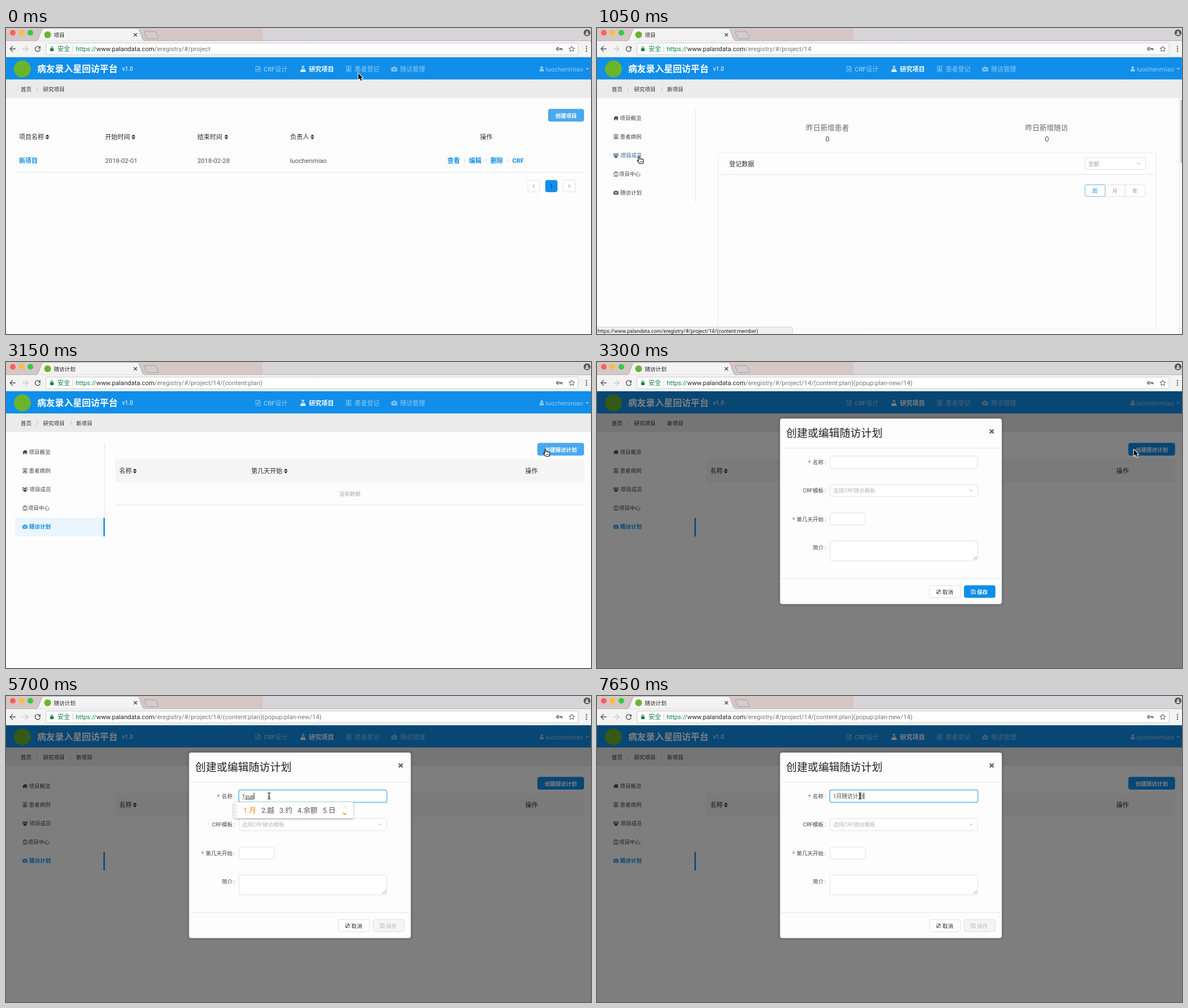
Animation, 1033 px wide and 542 px high, one loop 8 s. Source, as an HTML page with a canvas:

```html
<!DOCTYPE html>
<html lang="zh-CN">
<head>
<meta charset="utf-8">
<title>随访计划</title>
<style>
html, body { margin: 0; width: 100%; height: 100%; overflow: hidden; background: #fdfdfd; }
canvas { display: block; }
</style>
</head>
<body>
<canvas id="stage" width="1033" height="542"></canvas>
<script>
const c = document.getElementById('stage').getContext('2d');
const FONT = 'Roboto, "Noto Sans CJK SC", "Noto Sans CJK JP", sans-serif';
const LOOP = 8000, STEP = 150;
const BLUE = '#108ee9', LIGHT = '#49a9ee', INK = '#2b2b2b', GREY = '#d9d9d9', GREEN = '#0b8043', LOGO = '#6ab42d';
const USER = 'luochenmiao', APP = '病友录入星回访平台';
const HOST = 'www.palandata.com', ROOT = '/eregistry/#/project';

// Icons on a 12 unit grid, filled even-odd
const ICONS = {
  home: 'M0 6.2L6 1L8.6 3.2V1.6H10.2V4.6L12 6.2L11.2 7.1L10.3 6.4V11H7.2V8H4.8V11H1.7V6.4L.8 7.1Z',
  badge: 'M1 0H11V12H1ZM2 1V11H10V1ZM6 2.4a1.7 1.7 0 0 1 0 3.4a1.7 1.7 0 0 1 0-3.4ZM3.2 9.4Q3.2 6 6 6.4Q8.8 6 8.8 9.4Z',
  users: 'M6 2a2.1 2.1 0 0 1 0 4.2a2.1 2.1 0 0 1 0-4.2ZM2.4 11.5Q2.2 6.6 6 6.8Q9.8 6.6 9.6 11.5ZM2 1a1.6 1.6 0 0 1 0 3.2a1.6 1.6 0 0 1 0-3.2ZM10 1a1.6 1.6 0 0 1 0 3.2a1.6 1.6 0 0 1 0-3.2ZM-.4 8Q-.4 4.6 2.4 5L3 6.4L1.8 8ZM12.4 8Q12.4 4.6 9.6 5L9 6.4L10.2 8Z',
  clinic: 'M1 2.5H3.5V0H8.5V2.5H11V12H1ZM2 3.5V11H4.8V8.5H7.2V11H10V3.5H7.5V1H4.5V3.5ZM3.3 5H4.7V6.4H3.3ZM7.3 5H8.7V6.4H7.3ZM5.4 1.7H6.6V4H5.4Z',
  kit: 'M0 3H3.4V1.2H8.6V3H12V11H0ZM4.5 3H7.5V2.2H4.5ZM5.3 4.6V6.3H3.6V7.7H5.3V9.4H6.7V7.7H8.4V6.3H6.7V4.6ZM1.5 3V11H2.2V3ZM9.8 3V11H10.5V3Z',
  flask: 'M3.5 0H8.5V1.1H7.8V4.3L11.6 10.6Q11.8 12 10.4 12H1.6Q.2 12 .4 10.6L4.2 4.3V1.1H3.5ZM5.3 1.1V4.6L3.8 7.2H8.2L6.7 4.6V1.1Z',
  file: 'M1 0H7.8L11 3.2V12H1ZM2 1V11H10V4H7V1ZM3.2 5.2H4.1L4.9 8L5.6 5.2H6.4L7.1 8L7.9 5.2H8.8L7.6 9.4H6.7L6 7L5.3 9.4H4.4Z',
  user: 'M6 0a3 3 0 0 1 0 6.4a3 3 0 0 1 0-6.4ZM.8 11.6Q.6 6.4 3 6Q6 8.4 9 6Q11.4 6.4 11.2 11.6Z',
  ban: 'M6 0a6 6 0 0 1 0 12a6 6 0 0 1 0-12ZM3.4 9.9L9.9 3.4A4.6 4.6 0 0 1 3.4 9.9ZM2.1 8.6L8.6 2.1A4.6 4.6 0 0 0 2.1 8.6Z',
  save: 'M0 0H9L12 3V12H0ZM1.1 1.1V10.9H2.4V6.8H9.6V10.9H10.9V3.5L8.6 1.1V4.6H2.6V1.1ZM3.7 1.1V3.5H7.4V1.1ZM3.5 7.9V10.9H8.5V7.9Z'
};
const ARROW = 'M0 0V11.6L2.7 9.1L4.6 13.4L6.4 12.6L4.6 8.5H8.2Z';
const HAND = 'M2 1.5Q3-.6 4.2 1.3V5Q5.5 4 6.5 5.2Q8 4.4 8.8 5.6Q10.6 5 11 6.8V9.5L10 13.3H4.4L.6 8.8Q-.4 7 1 6.7L2.4 8Z';

// Pointer: time, x, y, shape
const POINTER = [
  [0, 622, 80, 'arrow'], [300, 240, 180, 'arrow'], [450, 38, 232, 'hand'], [600, 38, 232, 'arrow'],
  [900, 64, 219, 'hand'], [1050, 71, 227, 'hand'], [1200, 73, 236, 'hand'], [1650, 126, 285, 'hand'],
  [2250, 127, 284, 'hand'], [2400, 220, 270, 'arrow'], [3000, 946, 156, 'hand'], [3150, 949, 154, 'hand'],
  [3300, 948, 155, 'arrow'], [3450, 940, 157, 'arrow'], [3900, 480, 176, 'beam'], [4200, 464, 177, 'beam'], [LOOP, 464, 177, 'beam']
];
// Typing: time, committed text, composing text
const TYPING = [
  [0, '', ''], [4650, '1', ''], [5400, '1', 'y'], [5550, '1', 'yu'], [5700, '1', 'yue'], [5850, '1月', ''],
  [6000, '1月', 's'], [6150, '1月', 'su'], [6300, '1月', 'sui'], [6450, '1月', 'suif'], [6600, '1月', 'suifa'],
  [6750, '1月', 'suifang'], [7050, '1月', 'suifangj'], [7200, '1月', 'suifangji'], [7350, '1月', 'suifangjihu'],
  [7500, '1月', 'suifangjihua'], [7650, '1月随访计划', '']
];
const candidates = word =>
  word[0] === 'y' ? '月 越 约 余额 日' :
  word.length < 4 ? '随机 虽然 随便 随时 随意' :
  word.length < 8 ? '随访 随风 随份 岁方 随方' : '随访计划 随访级 随访 随方 岁';

function setFont(size, weight = 400) { c.font = `${weight} ${size}px ${FONT}`; }
function text(s, x, y, size, color = INK, weight = 400, align = 'left') {
  setFont(size, weight);
  c.textAlign = align;
  c.fillStyle = color;
  c.fillText(s, x, y + size * .37);
  return x + c.measureText(s).width;
}
function rect(x, y, w, h, fill) { c.fillStyle = fill; c.fillRect(x, y, w, h); }
function box(x, y, x2, y2, fill, line = GREY, r = 3) {
  c.beginPath();
  c.roundRect(x + .7, y + .7, x2 - x - 1.4, y2 - y - 1.4, r);
  c.fillStyle = fill;
  c.fill();
  c.strokeStyle = line;
  c.lineWidth = .8;
  c.stroke();
}
function dot(x, y, r, fill) { c.beginPath(); c.arc(x, y, r, 0, 7); c.fillStyle = fill; c.fill(); }
function path(d, x, y, { fill, line, width = 1, scale = 1 }) {
  const p = new Path2D(d);
  c.save();
  c.translate(x, y);
  c.scale(scale, scale);
  c.lineWidth = width;
  c.lineJoin = 'round';
  if (fill) { c.fillStyle = fill; c.fill(p, 'evenodd'); }
  if (line) { c.strokeStyle = line; c.stroke(p); }
  c.restore();
}
function icon(name, x, y, size, fill) { path(ICONS[name], x - size / 2, y - size / 2, { fill, scale: size / 12 }); }
function sorter(x, y) { path('M-3.5-.8L0-4.2L3.5-.8ZM-3.5.8L0 4.2L3.5.8Z', x, y, { fill: INK }); }
function chevron(x, y) { path('M-2.6-1.4L0 1.4L2.6-1.4', x, y, { line: '#aaa' }); }
function button(s, x, y, x2, y2, fill) {
  box(x, y, x2, y2, fill, fill);
  text(s, (x + x2) / 2, (y + y2) / 2 + .5, 9.5, '#fff', 700, 'center');
}

function browser(t) {
  rect(0, 0, 1033, 23, '#d5c7c6');
  rect(453, 0, 580, 23, '#d8d5da');
  [['#fc605c', 12], ['#fdbc40', 27.5], ['#34c84a', 43]].forEach(([color, x]) => dot(x, 8.5, 5, color));
  rect(0, 23, 1033, 28.7, '#f3f3f3');
  rect(0, 22, 1033, 1, '#b9b0b0');
  path('M52 23Q56 22 57 19L63 3Q64 .5 67 .5H231Q234 .5 235 3L241 19Q242 22 246 23Z', 0, 0, { fill: '#f3f3f3', line: '#b0a6a6' });
  rect(53, 22.5, 192, 2, '#f3f3f3');
  path('M245 6.5H262Q264 6.5 265 8L269 17Q269 19 267 19H251Q249 19 248 17L244 8Z', 0, 0, { fill: '#d3cccc', line: '#a59d9d' });
  dot(73.5, 12, 6, LOGO);
  text(t < 2400 ? '项目' : '随访计划', 84.5, 12, 9.5, '#222');
  path('M-2.8-2.8L2.8 2.8M2.8-2.8L-2.8 2.8', 228.5, 12, { line: '#444', width: 1.3 });
  dot(1026, 8.5, 6, '#555');
  icon('user', 1026, 9, 7, '#ddd');

  path('M5 0H-5M0-5L-5 0L0 5', 12, 37, { line: '#555', width: 1.4 });
  path('M-5 0H5M0-5L5 0L0 5', 34, 37, { line: '#ccc', width: 1.4 });
  path('M3.6-2.6A4.5 4.5 0 1 0 4.4 1', 56, 37, { line: '#555', width: 1.4 });
  path('M5-5V-.6H.6Z', 56, 37, { fill: '#555' });
  box(70, 26, 1011, 48, '#fff', '#bdbdbd', 2);
  path('M-3-1H3V4H-3ZM-2-1V-2.6A2 2 0 0 1 2-2.6V-1H1V-2.4A1 1 0 0 0-1-2.4V-1Z', 81, 37, { fill: GREEN });
  text('安全', 91, 37, 11, GREEN);
  rect(117.5, 31, 1, 12, '#ccc');
  let route = ROOT;
  if (t >= 600) route += '/14';
  if (t >= 1950) route += '/(content:plan)';
  if (t >= 3300) route += '(popup:plan-new/14)';
  let x = text('https://', 123, 37, 11.26, GREEN);
  x = text(HOST, x, 37, 11.26, '#222');
  text(route, x, 37, 11.26, '#777');
  path('M-2-1H6V3H4.5V1H-2ZM-3-3a3 3 0 0 1 0 6a3 3 0 0 1 0-6ZM-3.5-1a1 1 0 0 0 0 2a1 1 0 0 0 0-2Z', 977, 37, { fill: '#555', scale: .9 });
  path('M0-5L1.5-1.6L5-1.3L2.3 1L3.2 4.5L0 2.6L-3.2 4.5L-2.3 1L-5-1.3L-1.5-1.6Z', 999, 37, { line: '#555' });
  [-4, 0, 4].forEach(d => dot(1025, 37 + d, 1.2, '#555'));
}

function header(t) {
  rect(0, 51, 1033, 491, '#fdfdfd');
  rect(0, 51, 1033, 40.4, BLUE);
  dot(29, 72.5, 15, LOGO);
  text(APP, 55, 72, 15.8, '#fff', 700);
  text('v1.0', 205, 72.5, 10, '#d5ebfb', 500);
  const dim = 'rgba(255,255,255,.55)';
  [['file', 'CRF设计', 445, 455], ['flask', '研究项目', 524.5, 535], ['badge', '患者登记', 605, 615.5], ['kit', '随访管理', 685.5, 696]]
    .forEach(([name, label, ix, tx], i) => {
      const color = i === 1 ? '#fff' : dim;
      icon(name, ix, 72.5, 10.5, color);
      text(label, tx, 72.5, 11, color, i === 1 ? 700 : 500);
    });
  icon('user', 946, 72.5, 9, dim);
  text(USER, 953, 72.5, 11.5, dim);
  path('M-3-1.5H3L0 1.5Z', 1026.5, 72.5, { fill: dim });

  rect(0, 91.4, 1033, 32.6, '#ebebeb');
  text('首页', 26, 108, 9.5);
  text('/', 53.5, 108, 9.5, '#aaa');
  text('研究项目', 65.5, 108, 9.5);
  if (t >= 600) {
    text('/', 112.5, 108, 9.5, '#aaa');
    text('新项目', 124, 108, 9.5);
  }
}

function projectList() {
  button('创建项目', 957, 143, 1021, 166, LIGHT);
  [['项目名称', 23, 73], ['开始时间', 175, 225], ['结束时间', 338, 389], ['负责人', 502, 541]].forEach(([s, x, sx]) => {
    text(s, x, 193, 11, INK, 500);
    sorter(sx, 193);
  });
  text('操作', 837, 193, 11, INK, 500);
  text('新项目', 23, 235, 11, BLUE, 700);
  text('2018-02-01', 175, 235, 11.3, '#555');
  text('2018-02-28', 338, 235, 11.3, '#555');
  text(USER, 501.5, 235, 11.3, '#555');
  [['查看', 779.5], ['编辑', 817.5], ['删除', 855.5], ['CRF', 894]].forEach(([s, x], i) => {
    text(s, x, 235, 11, BLUE, 700);
    if (i) rect(x - 8.5, 232, 1, 6, '#ccc');
  });
  rect(16, 255, 1005, 1, '#e6e6e6');
  box(921, 269, 943, 291, '#fff');
  box(952, 269, 974, 291, BLUE, BLUE);
  box(983, 269, 1006, 291, '#fff');
  text('1', 963, 280, 10, '#1b2b3b', 400, 'center');
  path('M1.5-2.5L-1.5 0L1.5 2.5', 932, 280, { line: '#888' });
  path('M-1.5-2.5L1.5 0L-1.5 2.5', 994.5, 280, { line: '#888' });
}

function sidebar(t) {
  const open = t < 3300;
  if (open) rect(173.5, 143, 1, 166, '#e4e4e4');
  if (open && t >= 2250) rect(16, 276, 157, 33, '#eaf5fe');
  if (t >= 1950) rect(172, 276, 2.5, 33, BLUE);
  [['home', '项目概览', 40.5], ['badge', '患者病例', 40.5], ['users', '项目成员', 41.5], ['clinic', '项目中心', 39], ['kit', '随访计划', 41]]
    .forEach(([name, label, x], i) => {
      const y = 159.5 + 33 * i;
      const picked = i === 4 && t >= 1650, hover = i === 2 && t >= 900 && t < 1350;
      const color = picked ? BLUE : hover ? '#2f5f86' : '#444';
      icon(name, 33.5, y, 9, color);
      text(label, x, y, 9.5, color, picked ? 700 : 400);
    });
}

function overview() {
  text('昨日新增患者', 407, 176.5, 12.6, '#666', 300, 'center');
  text('昨日新增随访', 794, 176.5, 12.6, '#666', 300, 'center');
  text('0', 407, 196, 12.6, '#555', 400, 'center');
  text('0', 794.5, 196, 12.6, '#555', 400, 'center');
  box(213, 220, 988, 534, '#fdfdfd', '#e6e6e6', 2);
  rect(214, 259, 773, 1, '#e6e6e6');
  text('登记数据', 233.5, 240.5, 11, INK, 500);
  box(861, 229, 969, 251, '#fff');
  text('全部', 867.5, 240.5, 9.5, '#999');
  chevron(956, 240);
  box(861, 277, 969, 299, '#fff');
  rect(932, 278, 1, 20, GREY);
  box(861, 277, 898, 299, '#fff', LIGHT);
  text('周', 879, 288, 9.5, BLUE, 400, 'center');
  text('月', 914.5, 288, 9.5, '#999', 400, 'center');
  text('年', 950, 288, 9.5, '#999', 400, 'center');
  rect(1028, 124, 1, 418, '#e8e8e8');
  rect(1029, 124, 4, 418, '#fafafa');
  rect(1030.5, 127, 2.5, 112, '#bfbfbf');
}

function planTable(t) {
  button('创建随访计划', 938, 143, 1021, 166, t >= 3000 && t < 3300 ? LIGHT : BLUE);
  rect(193, 172, 828, 41, '#f5f5f5');
  text('名称', 200, 193, 11, INK, 500);
  sorter(227.5, 193);
  text('第几天开始', 433, 193, 11, INK, 500);
  sorter(494, 193);
  text('操作', 917, 193, 11, INK, 500);
  text('没有数据', 588, 233, 9.5, '#aaa', 300);
  if (t < 3300) rect(193, 253, 828, 1, '#e6e6e6');
}

function status(t) {
  const plan = t >= 1650, linked = t >= 450 && t < 600;
  if (!linked && (t < 900 || t >= 2400)) return;
  box(-2, 529, 346, 545, '#f0f0f0', '#c4c4c4');
  const tail = linked ? '' : plan ? '/(content:plan)' : '/(content:member)';
  text('https://' + HOST + ROOT + '/14' + tail, 1, 536.5, 9.12, '#222');
}

function popup(x, word) {
  const gap = 9.1;
  const items = candidates(word).split(' ').map((s, i) => `${i + 1}.${s}`);
  setFont(12.5);
  const widths = items.map(s => c.measureText(s).width);
  const inner = widths.reduce((sum, w) => sum + w + gap, 0);
  const right = x + 18 + inner + 22;
  c.save();
  c.shadowColor = 'rgba(0,0,0,.3)';
  c.shadowBlur = 4;
  c.shadowOffsetY = 1;
  rect(x + 1, 188, right - x - 1, 28.5, '#fff');
  c.restore();
  rect(x + 1, 188, 7, 28.5, '#f4f4f4');
  for (let y = 193; y < 215; y += 6) dot(x + 3, y, .8, '#bbb');
  let cx = x + 18;
  items.forEach((s, i) => {
    text(s, cx, 202.3, 12.5, i ? '#555' : '#f5821f');
    cx += widths[i] + gap;
  });
  path('M-3 1.5L0-1.5L3 1.5', cx + 7, 197, { line: '#f9c9a0' });
  path('M-3-1.5L0 1.5L3-1.5', cx + 7, 208.5, { line: '#f5821f', width: 1.3 });
}

function label(s, y, starX) {
  text(s, 400, y, 9.5, '#444', 400, 'right');
  text(':', 402, y, 9.5, '#444');
  if (starX) text('*', starX, y + 1, 10, '#f04134');
}

function dialog(t) {
  rect(0, 51.7, 1033, 491, 'rgba(0,0,0,.5)');
  c.save();
  c.shadowColor = 'rgba(0,0,0,.25)';
  c.shadowBlur = 4;
  box(322, 99, 716, 430, '#fdfdfd', '#5c5c5c', 4);
  c.restore();
  text('创建或编辑随访计划', 334, 126.5, 18.9, '#222', 500);
  path('M-3.4-3.4L3.4 3.4M3.4-3.4L-3.4 3.4', 697, 123, { line: '#666', width: 2.4 });
  rect(323, 152, 392, 1, '#e6e6e6');
  rect(323, 383, 392, 1, '#e6e6e6');

  label('名称', 177, 373);
  label('CRF模板', 227.5);
  label('第几天开始', 278, 345);
  label('简介', 328.5);
  const focused = t >= 4350;
  if (focused) box(409, 164.4, 674.6, 190.4, '#b9ddf8', '#d3eafb', 4);
  box(410.6, 166, 673, 188.8, '#fff', focused ? '#2f9cec' : GREY);
  box(410.6, 216.4, 673, 239, '#fff');
  text('选择CRF随访模板', 417, 227.5, 9.5, '#b5b5b5');
  chevron(660.5, 227.5);
  box(410.6, 266.8, 474.6, 289.6, '#fff');
  box(410.6, 316, 673, 352.8, '#fff');
  path('M665 350L671 344M668.5 350L671 347.5', 0, 0, { line: '#888' });

  box(586.6, 395.2, 642.4, 418, '#fff');
  icon('ban', 603, 407, 8, INK);
  text('取消', 610, 407, 9.5, INK);
  const ready = t < 3600;
  box(647.8, 395.2, 703.8, 418, ready ? BLUE : '#f5f5f5', ready ? BLUE : GREY);
  icon('save', 664.5, 407, 8, ready ? '#fff' : '#bbb');
  text('保存', 671, 407, 9.5, ready ? '#fff' : '#bbb', ready ? 700 : 400);

  if (!focused) return;
  const [, done, word] = TYPING.findLast(k => k[0] <= t);
  const start = text(done, 417, 177, 9.7, '#444');
  const end = text(word, start, 177, 9.7, '#444');
  rect(end, 171.5, 1, 11, '#222');
  if (!word) return;
  for (let x = 417; x < start; x += 2) rect(x, 182, 1, 1, '#e33');
  rect(start, 182, end - start, 1, '#222');
  popup(done.length > 1 ? 410 : 401, word);
}

function pointer(t) {
  const i = POINTER.findLastIndex(k => k[0] <= t);
  const [t0, x0, y0, shape] = POINTER[i], [t1, x1, y1] = POINTER[i + 1];
  const k = (t - t0) / (t1 - t0), x = x0 + (x1 - x0) * k, y = y0 + (y1 - y0) * k;
  if (shape === 'beam') {
    const beam = 'M-2.5-5.5Q0-5.5 0-4Q0-5.5 2.5-5.5M0-4V4M-2.5 5.5Q0 5.5 0 4Q0 5.5 2.5 5.5M-1.5 1.5H1.5';
    path(beam, x + .5, y, { line: '#222', width: 1.2 });
  } else if (shape === 'hand') {
    path(HAND, x, y, { fill: '#fff', line: '#111', width: 1.1 });
    path('M5.2 8.5V11M7 8.5V11M8.8 8.5V11', x, y, { line: '#111', width: .7 });
  } else {
    path(ARROW, x, y, { line: '#fff', width: 2 });
    path(ARROW, x, y, { fill: '#111' });
  }
}

function frame(now) {
  const t = Math.floor(now % LOOP / STEP) * STEP;
  header(t);
  if (t < 600) projectList();
  else {
    sidebar(t);
    if (t < 1950) overview();
    else planTable(t);
  }
  if (t >= 3300) dialog(t);
  browser(t);
  status(t);
  pointer(t);
  requestAnimationFrame(frame);
}
requestAnimationFrame(frame);
</script>
</body>
</html>
```
